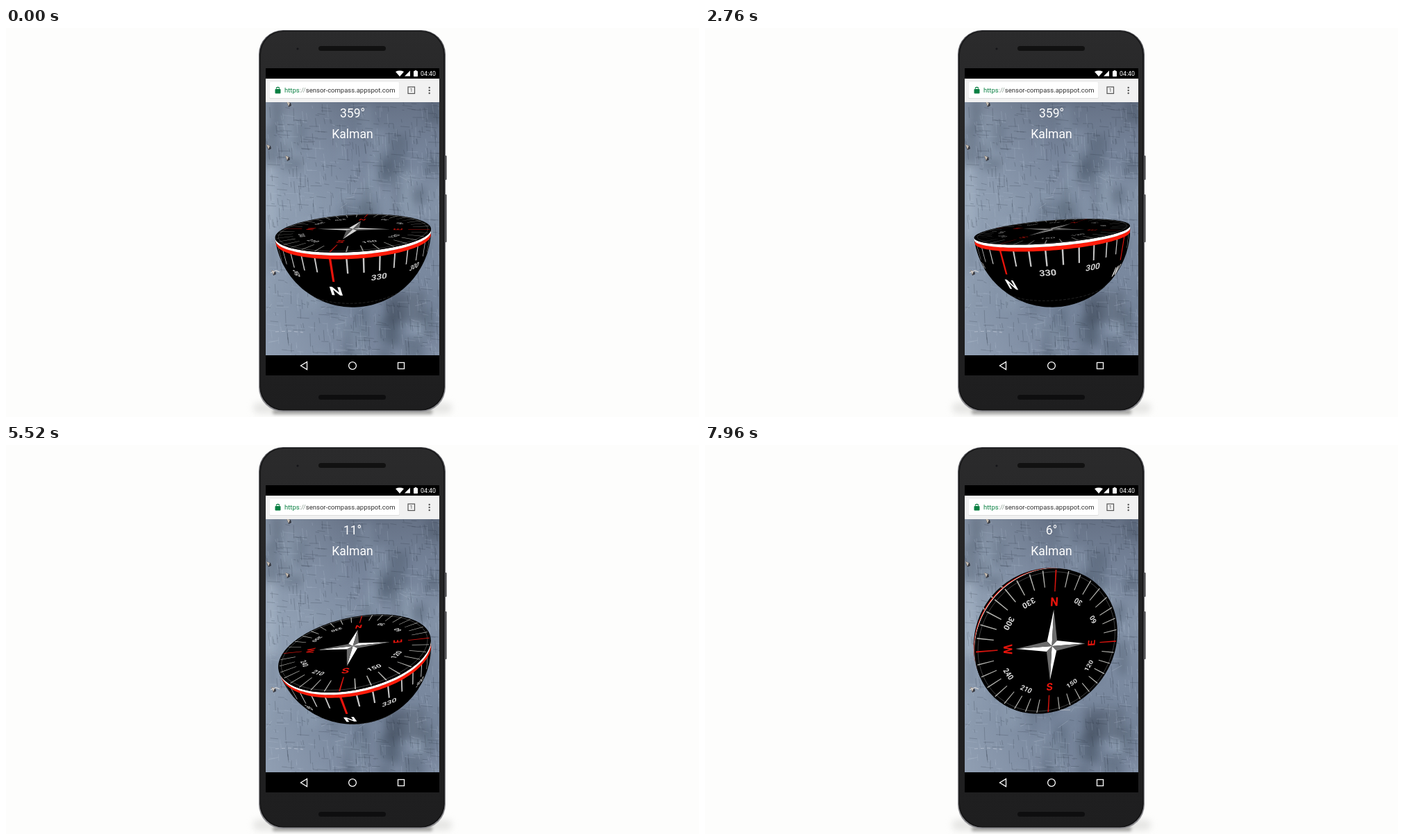
An HTML page with a canvas that plays this animation: 998x561 px, repeating every 8 s.

```html
<!DOCTYPE html>
<html lang="en">
<head>
<meta charset="utf-8">
<title>Compass</title>
<style>
  html, body { margin: 0; width: 100%; height: 100%; overflow: hidden; background: #fdfdfc; }
  canvas { display: block; }
</style>
</head>
<body>
<canvas id="stage" width="998" height="561"></canvas>
<script>
const W = 998, H = 561, LOOP = 8000, RAD = Math.PI / 180;
const RED = '#e8140c', FONT = 'Roboto, sans-serif';
const stage = document.getElementById('stage').getContext('2d');
let ctx = stage;

// ---------- drawing helpers ----------
function rect(x, y, w, h, fill, radius = 0) {
  ctx.fillStyle = fill;
  ctx.beginPath();
  ctx.roundRect(x, y, w, h, radius);
  ctx.fill();
}

function poly(points, fill) {
  ctx.fillStyle = fill;
  ctx.beginPath();
  points.forEach(p => ctx.lineTo(p[0], p[1]));
  ctx.closePath();
  ctx.fill();
}

function line(points, stroke, width = 1) {
  ctx.strokeStyle = stroke;
  ctx.lineWidth = width;
  ctx.beginPath();
  points.forEach(p => ctx.lineTo(p[0], p[1]));
  ctx.stroke();
}

function dot(x, y, r, fill) {
  ctx.fillStyle = fill;
  ctx.beginPath();
  ctx.arc(x, y, r, 0, 7);
  ctx.fill();
}

function write(text, x, y, size, fill, align = 'left') {
  ctx.font = size + 'px ' + FONT;
  ctx.fillStyle = fill;
  ctx.textAlign = align;
  ctx.textBaseline = 'alphabetic';
  ctx.fillText(text, x, y);
}

function gradient(x0, y0, x1, y1, ...stops) {
  const g = ctx.createLinearGradient(x0, y0, x1, y1);
  stops.forEach((c, i) => g.addColorStop(i / (stops.length - 1), c));
  return g;
}

function randomizer(seed) {
  return () => (seed = (seed * 16807) % 2147483647) / 2147483647;
}

// ---------- still parts ----------
function drawPhone() {
  rect(0, 0, W, H, '#fdfdfc');
  ctx.filter = 'blur(5px)';
  rect(356, 540, 286, 16, '#e6e6e4', 8);
  ctx.filter = 'blur(2px)';
  rect(384, 550, 230, 7, '#a5a5a3', 3);
  ctx.filter = 'none';
  rect(631, 184, 3.5, 35, '#3a3a3d', 1);
  rect(631, 240, 3.5, 69, '#3a3a3d', 1);
  rect(364, 3, 269, 550.5, gradient(0, 3, 0, 553, '#55565a', '#6a6a6e', '#8e8e92'), 35);
  rect(365.3, 4, 266.4, 547.5, '#141415', 34);
  rect(367, 5, 263, 545, gradient(0, 0, 0, H, '#2b2b2c', '#222223', '#1e1e1f'), 33);
  rect(450, 26, 97, 7, '#111', 3.5);
  rect(450, 529, 97, 7, '#0e0e0f', 3.5);
  dot(420, 30, 1.5, '#151518');
  rect(374, 58, 250, 443, '#000');
}

function drawWall() {
  const random = randomizer(77);
  ctx.save();
  ctx.beginPath();
  ctx.rect(374, 107, 250, 365);
  ctx.clip();
  rect(374, 107, 250, 365, gradient(0, 107, 0, 472, '#667286', '#76849a', '#8291a6', '#7c8ba1', '#75849a', '#7c8aa0'));
  rect(374, 107, 250, 365, gradient(374, 0, 500, 0, 'rgba(172,187,204,.42)', 'rgba(172,187,204,0)'));
  // broad soft stains
  ctx.filter = 'blur(6px)';
  for (let i = 0; i < 60; i++) {
    const tone = random() < .5 ? '40,50,66' : '160,176,196';
    rect(364 + random() * 250, 100 + random() * 370, 6 + random() * 22, 16 + random() * 50, `rgba(${tone},.22)`);
  }
  rect(374, 195, 14, 110, 'rgba(180,194,210,.4)');
  rect(548, 380, 55, 45, 'rgba(40,46,60,.3)');
  // fine brushed grain
  ctx.filter = 'none';
  for (let i = 0; i < 1100; i++) {
    const x = 374 + random() * 250, y = 107 + random() * 365, length = 3 + random() * 16;
    const upright = random() < .6;
    const tone = random() < .55 ? '38,46,62' : '182,196,212';
    line([[x, y], [x + (upright ? random() * 2 : length), y + (upright ? length : random() * 2)]], `rgba(${tone},.22)`);
  }
  // long scratches
  for (let i = 0; i < 22; i++) {
    const x = 374 + random() * 250, y = 190 + random() * 270;
    line([[x, y], [x + random() * 40 - 20, y + random() * 24 - 12]], 'rgba(200,208,222,.35)', .7);
  }
  // peeled chips
  for (const [x, y] of [[375, 168], [402, 184], [404, 106], [382, 349]]) {
    poly([[x, y], [x + 6, y + 2], [x + 7, y + 6], [x + 3, y + 8]], '#35373f');
    poly([[x, y], [x + 5, y + 2], [x + 3, y + 7]], '#c5bbb0');
  }
  line([[381, 353], [389, 350], [394, 352]], '#d5d5d8', 1.2);
  ctx.setLineDash([5, 4]);
  line([[388, 438], [408, 437], [428, 439]], '#b2bccb', 1);
  ctx.setLineDash([]);
  line([[506, 382], [526, 382]], '#b5b9c3', 1);
  ctx.restore();
}

function drawBars() {
  // status bar
  poly([[561, 63], [564, 61.8], [567, 61.4], [570, 61.8], [573, 63], [567, 70]], '#fff');
  poly([[582, 61.5], [582, 69.5], [574, 69.5]], '#fff');
  rect(587, 62, 6, 8, '#fff', .8);
  rect(588.7, 61, 2.6, 2, '#fff');
  write('04:40', 597, 69, 8.8, '#fff');
  // address bar
  rect(374, 73, 250, 34, '#f1f1f1');
  rect(379, 78, 188, 24, '#dcdcdc', 2);
  rect(379.5, 78, 187, 23, '#fff', 1.5);
  rect(387.5, 88, 8, 6.5, '#0b8043', 1);
  ctx.strokeStyle = '#0b8043';
  ctx.lineWidth = 1.2;
  ctx.beginPath();
  ctx.arc(391.5, 87.6, 2.2, Math.PI, 0);
  ctx.stroke();
  ctx.save();
  ctx.beginPath();
  ctx.rect(400, 78, 162, 24);
  ctx.clip();
  let x = 401;
  for (const [text, color] of [['https', '#0b8043'], ['://', '#8a9a90'], ['sensor-compass.appspot.com', '#333']]) {
    write(text, x, 93.3, 9.5, color);
    x += ctx.measureText(text).width;
  }
  ctx.restore();
  ctx.strokeStyle = '#555';
  ctx.lineWidth = 1.2;
  ctx.strokeRect(579, 85, 9.5, 9.5);
  write('1', 583.8, 92.3, 7, '#444', 'center');
  for (const y of [86, 90, 94]) dot(609.7, y, 1.2, '#555');
  // navigation bar
  line([[433.5, 481.5], [433.5, 492.5], [424.5, 487], [433.5, 481.5], [433.5, 484]], '#fff', 1.3);
  ctx.beginPath();
  ctx.arc(499, 487, 5.4, 0, 7);
  ctx.stroke();
  ctx.strokeRect(564.5, 482.5, 9, 9);
}

const backdrop = document.createElement('canvas');
backdrop.width = W;
backdrop.height = H;
ctx = backdrop.getContext('2d');
drawPhone();
drawWall();
drawBars();
ctx = stage;

// ---------- motion ----------
// time, tilt right, tilt up, twist, shown heading (degrees)
const KEYS = [
  [0, -4.4, 76.4, 11.4, 359],
  [1920, -4.4, 76.4, 12.2, 359],
  [2760, -6.4, 81.5, 30.2, 359],
  [4320, -5.5, 86, 40.8, 359],
  [5520, -13.8, 61.5, 1.6, 371],
  [7120, 18.8, 7.6, 13, 346],
  [7960, 22, -18.9, -0.6, 366],
];

function slope(i, c) {
  const a = KEYS[i - 1], b = KEYS[i], d = KEYS[i + 1];
  if (!a || !d) return 0;
  const s = (b[c] - a[c]) / (b[0] - a[0]), e = (d[c] - b[c]) / (d[0] - b[0]);
  return s * e > 0 ? 2 * s * e / (s + e) : 0;
}

// monotone cubic between the keys
function channel(t, c) {
  let i = 0;
  while (i < KEYS.length - 2 && t > KEYS[i + 1][0]) i++;
  const a = KEYS[i], b = KEYS[i + 1], span = b[0] - a[0];
  const u = Math.min(1, (t - a[0]) / span), v = 1 - u;
  return v * v * (1 + 2 * u) * a[c] + u * u * (3 - 2 * u) * b[c]
    + span * u * v * (v * slope(i, c) - u * slope(i + 1, c));
}

// ---------- compass ----------
const CX = 499.5, CY = 290, SCALE = 109.5, NEAR = .235; // NEAR: radius / camera distance
let pose;

function setPose(t) {
  const tx = channel(t, 1), ty = channel(t, 2), twist = channel(t, 3), tilt = Math.hypot(tx, ty);
  pose = { mx: tx / tilt, my: ty / tilt, sin: Math.sin(tilt * RAD), cos: Math.cos(tilt * RAD), twist };
  pose.far = Math.atan2(tx, ty) / RAD - twist;
}

function project(x, y, z) {
  const k = SCALE / (1 - NEAR * z);
  return [CX + x * k, CY - y * k, z];
}

// bearing in degrees, radius and height in units of the bowl radius
function place(bearing, radius, height) {
  const a = (bearing + pose.twist) * RAD;
  const x = radius * Math.sin(a), y = radius * Math.cos(a);
  const d = x * pose.mx + y * pose.my;
  const shift = d * pose.cos + height * pose.sin - d;
  return project(x + shift * pose.mx, y + shift * pose.my, height * pose.cos - d * pose.sin);
}

const disc = (bearing, r) => place(bearing, r, 0);
const bowl = (bearing, depth) => place(bearing, Math.cos(depth * RAD), -Math.sin(depth * RAD));
const facing = p => p[2] > NEAR;
const sweep = Array.from({ length: 181 }, (_, i) => i * 2);

function tick(surface, bearing, from, to, half, color) {
  poly([surface(bearing - half, from), surface(bearing + half, from),
    surface(bearing + half, to), surface(bearing - half, to)], color);
}

// glyphs follow the surface; stepB and stepV each span 1% of the radius
function label(surface, text, bearing, v, size, color, stepB, stepV) {
  const p = surface(bearing, v), right = surface(bearing - stepB, v), up = surface(bearing, v - stepV);
  ctx.save();
  ctx.transform((right[0] - p[0]) * size, (right[1] - p[1]) * size,
    (p[0] - up[0]) * size, (p[1] - up[1]) * size, p[0], p[1]);
  ctx.font = 'bold 100px ' + FONT;
  ctx.textAlign = 'center';
  ctx.fillStyle = color;
  ctx.fillText(text, 0, 36);
  ctx.restore();
}

const nameOf = bearing => ({ 0: 'N', 90: 'E', 180: 'S', 270: 'W' })[bearing] || String(bearing);

function drawBowl() {
  const outline = [], ring = Math.sqrt(1 - NEAR * NEAR);
  for (const s of sweep) {
    const along = Math.cos(s * RAD) * ring, across = Math.sin(s * RAD) * ring;
    if (along * pose.sin + NEAR * pose.cos > 0) continue;
    outline.push(project(along * pose.mx + across * pose.my, along * pose.my - across * pose.mx, NEAR));
  }
  if (outline.length > 2) poly(outline, '#000');

  const arc = depth => sweep.map(s => bowl(pose.far + s, depth)).filter(facing);
  ctx.setLineDash([4, 2]);
  line(arc(46), '#2c2c2c', .8);
  ctx.setLineDash([]);

  for (let b = 0; b < 360; b += 10) {
    const main = b % 90 === 0, end = main ? 20.5 : 14;
    if (facing(bowl(b, end))) tick(bowl, b, 4, end, main ? .75 : .5, main ? RED : '#c8c8c8');
  }
  for (let b = 0; b < 360; b += 30) {
    const main = b % 90 === 0, depth = main ? 29 : 18.5;
    if (!facing(bowl(b, depth))) continue;
    label(bowl, nameOf((b + 180) % 360), b, depth, main ? .21 : .105, main ? '#fff' : '#d4d4d4',
      .573 / Math.cos(depth * RAD), .573);
  }
  for (const [from, to, color] of [[1.7, 4.2, '#ff1c0a'], [0, 1.8, '#fff']]) {
    poly([...arc(from), ...arc(to).reverse()], color);
  }
}

function drawDisc() {
  const circle = r => sweep.map(s => disc(s, r));
  poly(circle(1), '#000');
  // markings dim at a grazing view
  ctx.globalAlpha = Math.min(1, .25 + 2.5 * pose.cos);
  line(circle(.96), 'rgba(150,150,150,.55)', .8);
  for (let b = 0; b < 360; b += 10) {
    const main = b % 90 === 0;
    tick(disc, b, main ? .72 : .78, .985, main ? .5 : .4, main ? '#d8140e' : '#b4b4b0');
  }
  for (let b = 0; b < 360; b += 30) {
    const main = b % 90 === 0, r = main ? .59 : .67;
    label(disc, nameOf(b), b, r, main ? .155 : .1, main ? RED : '#dcdcdc', .573 / r, .01);
  }
  const centre = disc(0, 0);
  for (let b = 0; b < 360; b += 90) {
    poly([centre, disc(b, .49), disc(b - 45, .1)], '#fff');
    poly([centre, disc(b, .49), disc(b + 45, .1)], '#6c6c6c');
  }
  ctx.globalAlpha = 1;
}

function frame() {
  const t = performance.now() % LOOP;
  setPose(t);
  ctx.drawImage(backdrop, 0, 0);
  drawBowl();
  drawDisc();
  write(Math.round(channel(t, 4)) % 360 + '°', 499, 128.6, 17.5, '#fff', 'center');
  write('Kalman', 499, 159, 17.5, '#fff', 'center');
  requestAnimationFrame(frame);
}
requestAnimationFrame(frame);
</script>
</body>
</html>
```
